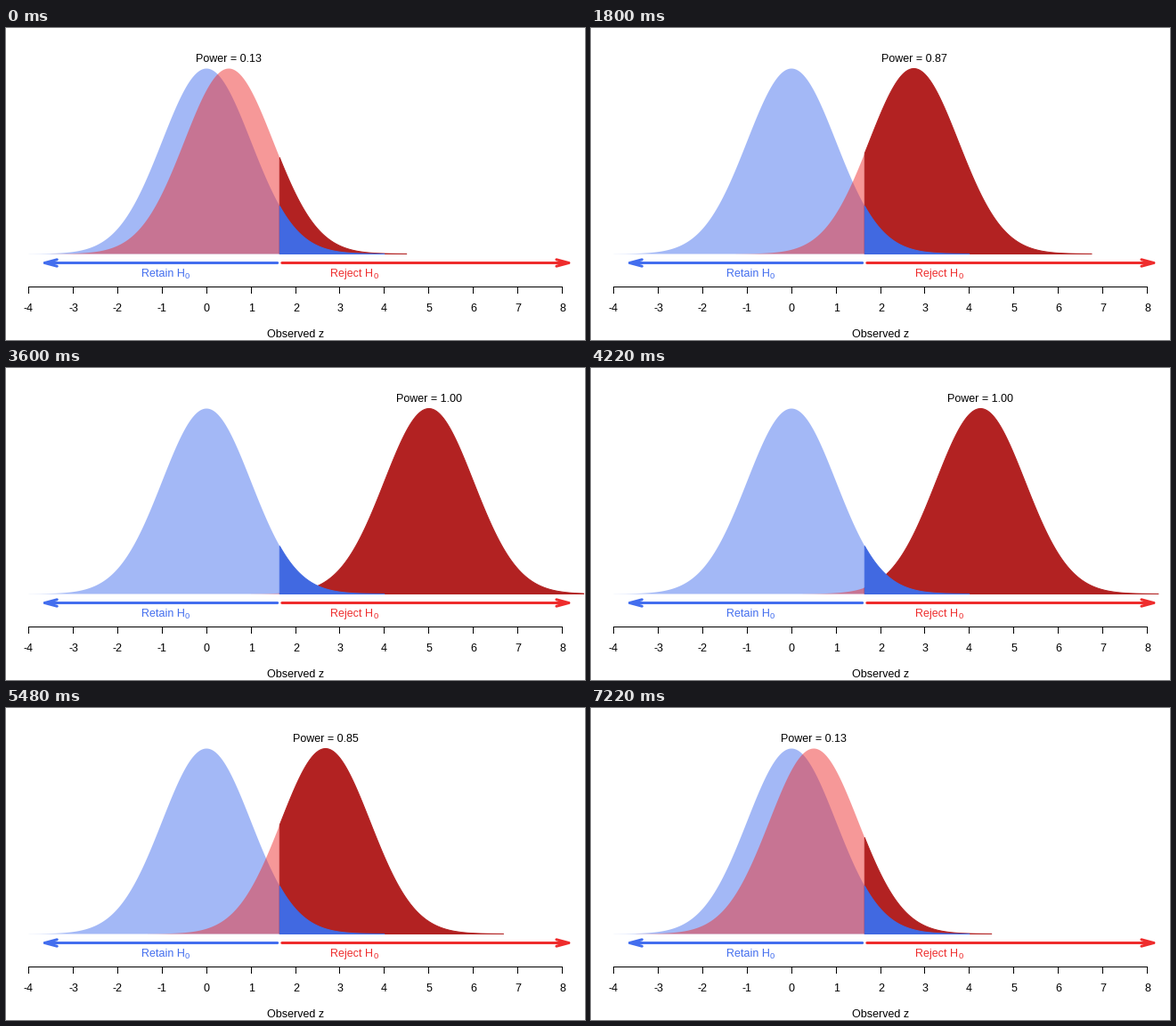
A matplotlib script for the animation above (7.24 s loop, 650 px wide and 350 px high).

```python
import math

import numpy as np
import matplotlib.pyplot as plt
from matplotlib.animation import FuncAnimation
from matplotlib.patches import Polygon

W, H, DPI = 650, 350, 100
PX = 72 / DPI                      # points per pixel
LEFT, UNIT = 25.41, 49.932         # pixel of z = -4, pixels per z
BASE, SCALE = 253.5, 521.4         # baseline row, pixels per unit density
CRIT, Z_MAX = 1.645, 8.48
STEPS = 180
LOW, HIGH = 0.5, 5.0

BLUE, LIGHT_BLUE = "#4169E1", "#436EEE"
RED, LIGHT_RED = "#B22222", "#EE2C2C"

plt.rcParams["font.family"] = "Liberation Sans"
fig = plt.figure(figsize=(W / DPI, H / DPI), dpi=DPI, facecolor="white")
ax = fig.add_axes([0, 0, 1, 1])
ax.set_xlim(0, W)
ax.set_ylim(H, 0)
ax.axis("off")


def px(z):
    return LEFT + (z + 4) * UNIT


def area(mean, lo, hi):
    """Outline of the region under a unit normal between lo and hi."""
    z = np.linspace(lo, hi, 200)
    pdf = np.exp(-(z - mean) ** 2 / 2) / math.sqrt(2 * math.pi)
    curve = np.column_stack([px(z), BASE - SCALE * pdf])
    return np.vstack([[px(lo), BASE], curve, [px(hi), BASE]])


def fill(points, color, alpha=1, edge=0):
    return ax.add_patch(Polygon(points, closed=True, fc=color, ec=color,
                                lw=edge * PX, alpha=alpha, joinstyle="bevel"))


def label(x, y, text, color="black", size=12.5, ha="center"):
    return ax.text(x, y, text, color=color, fontsize=size * PX, ha=ha, va="baseline")


def stroke(xs, ys, color="black", width=1, cap="butt"):
    ax.plot(xs, ys, color=color, lw=width * PX, snap=False,
            solid_capstyle=cap, solid_joinstyle="round")


def arrow(start, tip, color, y=263.5, length=14.4, angle=math.radians(15)):
    side = math.copysign(1, start - tip)
    back = tip + side * length * math.cos(angle)
    rise = length * math.sin(angle)
    stroke([start, tip], [y, y], color, 3, "round")
    stroke([back, tip, back], [y - rise, y, y + rise], color, 3, "round")


def hypothesis(x, word, color):
    label(x, 279, word + " H", color, ha="left")
    label(x + 48.5, 281, "0", color, 9.5, "left")


fill(area(0, -4, CRIT), LIGHT_BLUE, 0.485)
retain = fill(area(LOW, LOW - 4, CRIT), LIGHT_RED, 0.485)
reject = fill(area(LOW, CRIT, LOW + 4), RED, edge=1)
fill(area(0, CRIT, 4), BLUE, edge=1)
power = label(px(LOW), 38, "")

arrow(px(CRIT - 0.05), 43.4, LIGHT_BLUE)
arrow(px(CRIT + 0.05), px(CRIT + 6.5), LIGHT_RED)
hypothesis(152, "Retain", LIGHT_BLUE)
hypothesis(364, "Reject", LIGHT_RED)

ticks = [math.floor(px(z)) + 0.5 for z in range(-4, 9)]
stroke([ticks[0] - 0.5, ticks[-1] + 0.5], [290.5, 290.5])
for z, x in zip(range(-4, 9), ticks):
    stroke([x, x], [290, 298])
    label(x, 318, str(z))
label(px(2), 347, "Observed z")


def update(i):
    step = i if i <= STEPS else 2 * STEPS + 1 - i
    mean = LOW + (HIGH - LOW) * step / STEPS
    retain.set_xy(area(mean, mean - 4, CRIT))
    reject.set_xy(area(mean, CRIT, min(mean + 4, Z_MAX)))
    value = 0.5 * (1 + math.erf((mean - CRIT) / math.sqrt(2)))
    power.set_text(f"Power = {value:.2f}")
    power.set_x(px(mean))
    return retain, reject, power


anim = FuncAnimation(fig, update, frames=2 * STEPS + 2, interval=20, repeat=True)
plt.show()
```
